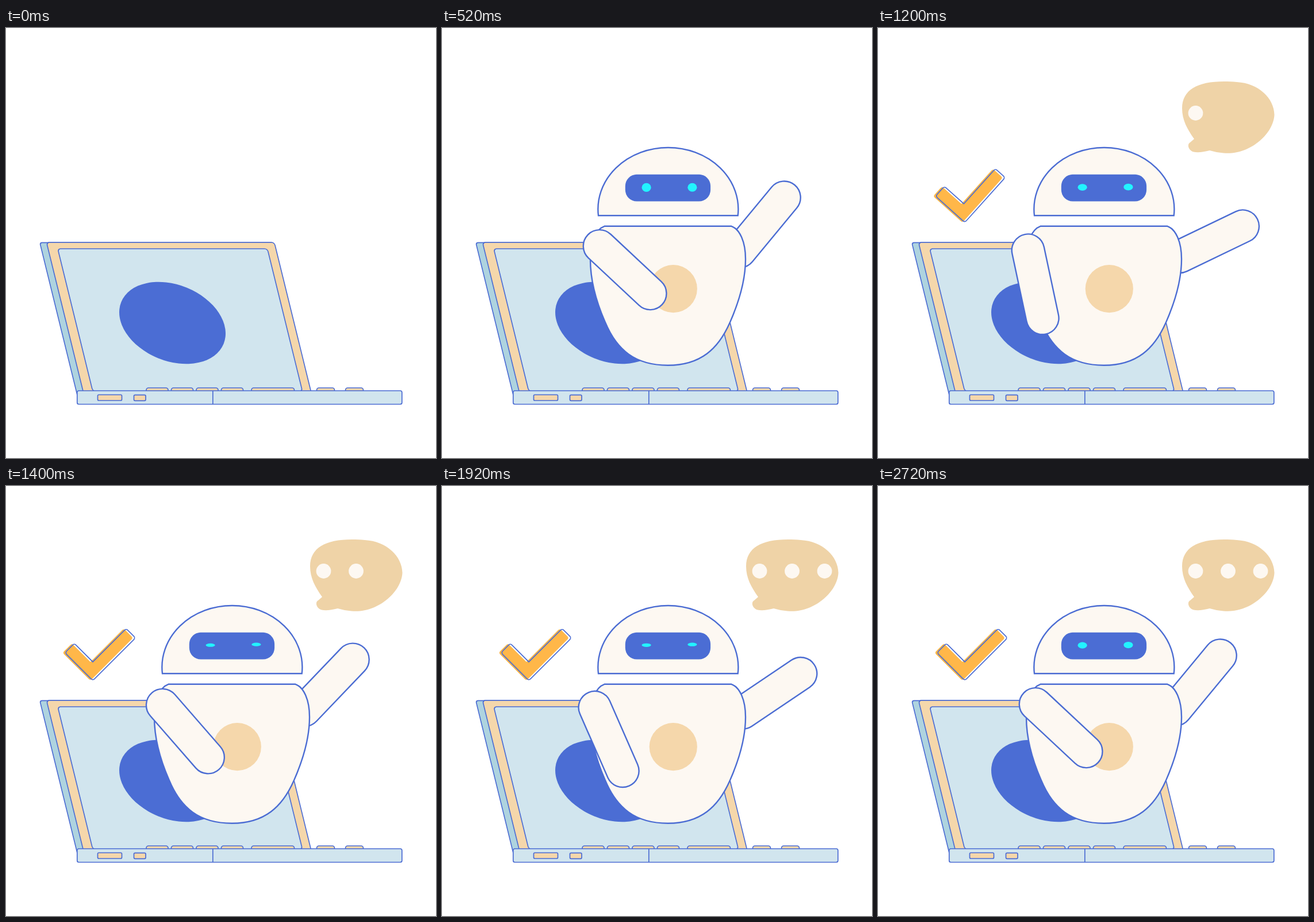
Recreate the animation shown at these times as an HTML page. Size 748 by 748 pixels, loop 2.76 s.

```html
<!DOCTYPE html>
<html lang="en">
<head>
<meta charset="utf-8">
<title>Robot helper</title>
<style>
  html, body { margin: 0; width: 100%; height: 100%; overflow: hidden; background: #fff; }
  svg { display: block; width: 100%; height: 100%; }
  .line { stroke: #4b6cd3; stroke-width: 1.7; }
  .bold { stroke: #4b6cd3; stroke-width: 2.4; fill: #fdf8f2; }
  .blue { fill: #4b6dd4; }
  .pale { fill: #d1e5ee; }
  .peach { fill: #f5d7ab; }
  .cream { fill: #fdf8f2; }
</style>
</head>
<body>
<svg viewBox="0 0 748 748">
  <defs>
    <path id="tick" d="M4 0H101a4 4 0 0 0 4-4V-19a4 4 0 0 0-4-4H23V-64.5a4 4 0 0 0-4-4H4a4 4 0 0 0-4 4V-4a4 4 0 0 0 4 4Z"/>
  </defs>
  <g id="laptop">
    <!-- Lid panels lean left; the base hides their lower ends. -->
    <rect class="line" fill="#aed3df" width="60" height="270" rx="4" transform="translate(58.8 373.3) skewX(13.8)"/>
    <rect class="line peach" width="396.3" height="270" rx="5" transform="translate(70.5 372.9) skewX(13.8)"/>
    <rect class="line pale" width="364.7" height="248" rx="5" transform="translate(90 384) skewX(13.8)"/>
    <ellipse class="blue" rx="96.2" ry="66.2" transform="translate(289.5 513) rotate(22.3)"/>
    <g id="keys" class="line peach"></g>
    <rect class="line pale" x="123.8" y="631" width="565" height="23.5" rx="3"/>
    <path class="line" d="M359.8 631V654.5"/>
    <rect class="line peach" x="159.5" y="638" width="42" height="10" rx="2"/>
    <rect class="line peach" x="222.5" y="638.3" width="20.5" height="10" rx="2"/>
  </g>
  <g id="robot">
    <rect id="rightArm" class="bold" x="-1" y="-28.4" width="178" height="56.8" rx="28.4"/>
    <path class="bold" d="M282.5 344.8H503.5C518 350 528 372 528 402C528 440 516 478 500.5 513C480.5 558 450 586.7 393 586.7S304 560 284 512C269 478 258 440 258 402C258 372 268 350 282.5 344.8Z"/>
    <circle class="peach" cx="402.3" cy="453.6" r="41.6"/>
    <path class="bold" d="M272 326.2A122 107.2 0 1 1 514.7 326.2Z"/>
    <rect class="blue" x="318.8" y="254.8" width="148.3" height="46.8" rx="20"/>
    <g fill="#22f3ff">
      <ellipse id="leftEye" cx="355.6" rx="8.1"/>
      <ellipse id="rightEye" cx="435.4" rx="8.1"/>
    </g>
    <rect id="leftArm" class="bold" x="-3.4" y="-28.3" width="177.2" height="56.6" rx="28.3"/>
  </g>
  <g id="check">
    <use href="#tick" fill="#ffb749" transform="translate(146.8 338.5) rotate(-45)"/>
    <use href="#tick" fill="none" class="line" transform="translate(151 338.5) rotate(-45)"/>
  </g>
  <path id="bubble" fill="#efd3a7" d="M529 140C529 108 555 93 602 93C610 93 617 93 624 94C662 96 689 122 689.5 151C688 185 645 222 601 217.5Q588 216.5 577 213C566 216 556 217 549 215.5C540 213 537 202 543 199L550 193C538 176 529 160 529 140Z"/>
  <g id="dots" class="cream"></g>
</svg>
<script>
  const LOOP = 2760, STEP = 40;
  const el = id => document.getElementById(id);
  const set = (node, attrs) => {
    for (const name in attrs) node.setAttribute(name, attrs[name]);
  };
  const show = (node, on) => set(node, { visibility: on ? 'visible' : 'hidden' });

  const key = (x, width) => `<rect x="${x}" y="626" width="${width}" height="9" rx="4"/>`;
  for (let i = 0; i < 4; i++) el('keys').innerHTML += key(244 + 43.5 * i, 38);
  el('keys').innerHTML += key(427, 74.5) + key(540.5, 31) + key(590.5, 31);

  for (let i = 0; i < 3; i++) {
    el('dots').innerHTML += `<circle cx="${552.5 + 56.5 * i}" cy="148" r="12.9"/>`;
  }

  // Rises linearly to 1 at the peak, then falls back to 0.
  const pulse = (t, peak, rise, fall) =>
    Math.max(0, Math.min(1 - (peak - t) / rise, 1 - (t - peak) / fall));

  // One swing to each side, starting at t = 0.
  const wobble = t => pulse(t, 140, 140, 140) - pulse(t, 280, 140, 120);

  function draw(now) {
    const t = Math.floor(now % LOOP / STEP) * STEP;
    show(el('robot'), t >= 480);
    show(el('check'), t >= 760);
    show(el('bubble'), t >= 1080);
    [...el('dots').children].forEach((dot, i) => show(dot, t >= 1160 + 160 * i));

    set(el('laptop'), { transform: `rotate(${-5.4 * wobble(t)} 320 643)` });
    set(el('check'), { transform: `rotate(${9.2 * wobble(t - 840)} 146 338)` });

    const wave = pulse(t, 1120, 360, 320) + pulse(t, 1760, 320, 320);
    set(el('leftArm'), { transform: `translate(255.9 362.4) rotate(${43.1 + 46.5 * wave})` });
    set(el('rightArm'), { transform: `translate(500.6 409.4) rotate(${-50.4 + 32.9 * wave})` });

    const ry = 8 * (.68 + .32 * Math.cos((t - 463) / 600 * 2 * Math.PI));
    set(el('leftEye'), { ry, cy: 276.4 + .13 * ry });
    set(el('rightEye'), { ry, cy: 274.6 + .35 * ry });
    requestAnimationFrame(draw);
  }
  requestAnimationFrame(draw);
</script>
</body>
</html>
```
